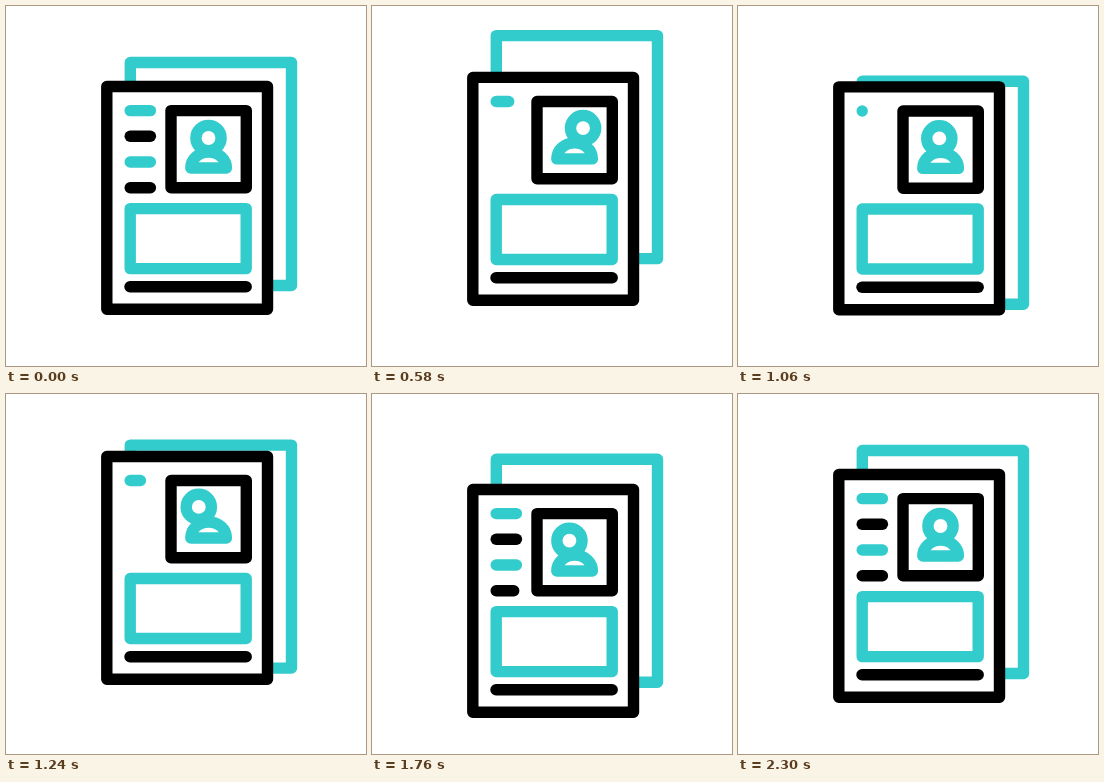
An HTML page that plays this animation: 360x360 px, repeating every 2400 ms.

```html
<!DOCTYPE html>
<html lang="en">
<head>
<meta charset="utf-8">
<title>Profile pages</title>
<style>
  html, body { margin: 0; width: 100%; height: 100%; overflow: hidden; background: #fff; }
  svg { display: block; width: 100vw; height: 100vh; }
  .ink, .teal { fill: none; stroke-width: 11.4; stroke-linecap: round; stroke-linejoin: round; }
  .ink { stroke: #000; }
  .teal { stroke: #33cccc; }
  .paper { fill: #fff; }
</style>
</head>
<body>
<svg viewBox="0 0 360 360">
  <g id="back">
    <rect class="teal" x="124.3" y="56.5" width="161.2" height="223"/>
  </g>
  <g id="front">
    <rect class="ink paper" x="100.8" y="80.5" width="160.7" height="222.8"/>
    <rect class="ink" x="165" y="104.6" width="75.3" height="77.2"/>
    <rect class="teal" x="124.2" y="202.6" width="116" height="60"/>
    <path class="ink" d="M124 280.8H240.2"/>
    <g id="lines"></g>
    <path class="teal" d="M184.8 162A17.8 16 0 0 1 220.4 162Z"/>
    <circle id="head" class="teal" cx="202.5" cy="132" r="12.6"/>
  </g>
</svg>
<script>
  const LOOP = 2400;
  const $ = id => document.getElementById(id);
  const back = $('back'), front = $('front'), head = $('head');

  // Each track is a list of [time, value] keys.
  const frontY = [[0, 0], [418, -29], [806, 24], [1286, -19], [1766, 15], [2165, 0]];
  const backY = [[110, 0], [520, -29], [985, 22], [1405, -19], [1900, 15], [2300, 0]];
  const headX = [[330, 0], [695, 11], [1430, -13.5], [2000, 0]];

  const ease = p => (1 - Math.cos(Math.PI * p)) / 2;

  function at(keys, t) {
    if (t <= keys[0][0]) return keys[0][1];
    for (let i = 1; i < keys.length; i++) {
      const [t0, a] = keys[i - 1], [t1, b] = keys[i];
      if (t < t1) return a + (b - a) * ease((t - t0) / (t1 - t0));
    }
    return keys[keys.length - 1][1];
  }

  // Lines retract from the bottom up, then grow from the top down.
  const lines = [0, 1, 2, 3].map(i => {
    const el = document.createElementNS('http://www.w3.org/2000/svg', 'path');
    el.setAttribute('class', i % 2 ? 'ink' : 'teal');
    $('lines').append(el);
    const out = 475 - i * 150, back = 1105 + i * 150;
    return { el, y: 104.6 + i * 25.7, keys: [[out, 1], [out + 250, 0], [back, 0], [back + 270, 1]] };
  });

  const shift = (el, x, y) => el.setAttribute('transform', `translate(${x} ${y})`);

  function draw(t) {
    shift(front, 0, at(frontY, t));
    shift(back, 0, at(backY, t));
    const x = at(headX, t);
    shift(head, x, -0.011 * x * x);
    lines.forEach(({ el, y, keys }, i) => {
      const size = at(keys, t);
      el.setAttribute('d', `M124.2 ${y}h${Math.max(size * 20.2, 0.01)}`);
      el.setAttribute('visibility', i && size < 0.005 ? 'hidden' : 'visible');
    });
  }

  const start = performance.now();
  function tick() {
    draw((performance.now() - start) % LOOP);
    requestAnimationFrame(tick);
  }
  tick();
</script>
</body>
</html>
```
